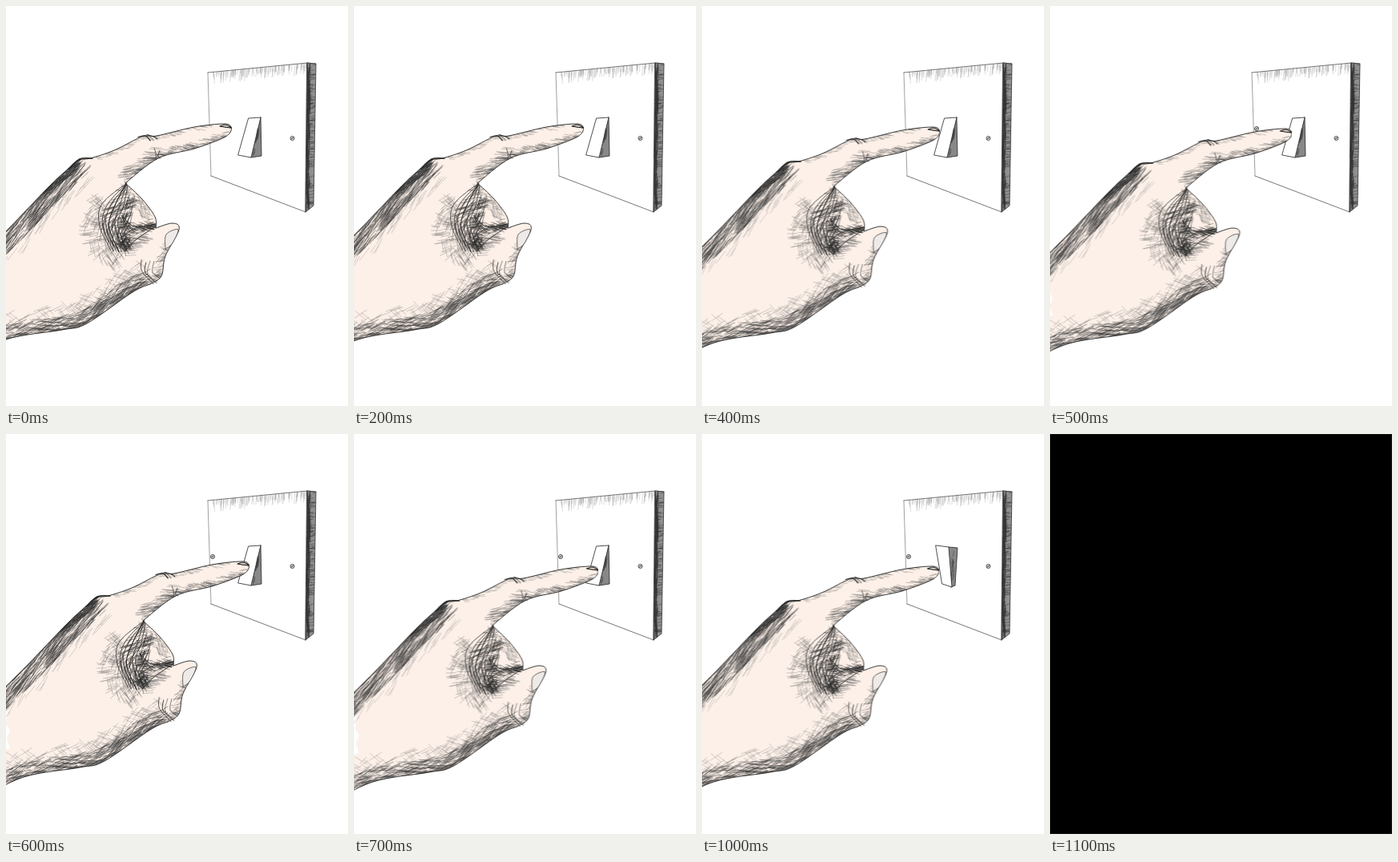
Animation of 427x499 px, one loop 3.1 s. Source, as an HTML page:

```html
<!DOCTYPE html>
<html lang="en">
<head>
<meta charset="utf-8">
<title>Light switch</title>
<style>
html, body { margin: 0; width: 100%; height: 100%; overflow: hidden; background: #fff; }
svg { display: block; width: 100%; height: 100%; }
path { fill: none; stroke: #222; stroke-width: .8; stroke-linecap: round; stroke-linejoin: round; }
#hand, #lift, #up, #down, #screw, #dark { animation: 3100ms step-end infinite; }
#hand { animation-name: reach; }
#lift { animation-name: press; }
#up { animation-name: leave; }
#down { animation-name: flip; }
#screw { animation-name: reveal; }
#dark { animation-name: blackout; }
/* one step every 100 ms */
@keyframes reach {
  0% { transform: translateX(0); }
  3.225% { transform: translateX(0); animation-timing-function: steps(4); }
  16.129% { transform: translateX(20.5px); animation-timing-function: steps(2); }
  22.58% { transform: translateX(23.5px); }
  25.806% { transform: translateX(23.5px); animation-timing-function: steps(2); }
  32.258%, 100% { transform: translateX(14.5px); }
}
@keyframes press {
  0% { transform: translateY(0); }
  6.451% { transform: translateY(0); animation-timing-function: steps(3); }
  16.129% { transform: translateY(6px); animation-timing-function: steps(2); }
  22.58% { transform: translateY(18px); }
  25.806% { transform: translateY(21px); animation-timing-function: steps(2); }
  32.258%, 100% { transform: translateY(18px); }
}
@keyframes leave { 0% { opacity: 1; } 25.806%, 100% { opacity: 0; } }
@keyframes flip { 0% { opacity: 0; } 25.806%, 100% { opacity: 1; } }
@keyframes reveal { 0% { opacity: 0; } 16.129%, 100% { opacity: 1; } }
@keyframes blackout { 0% { opacity: 0; } 35.483%, 100% { opacity: 1; } }
</style>
</head>
<body>
<svg viewBox="0 0 427 499" preserveAspectRatio="none">
  <defs>
    <clipPath id="handClip"><path id="clipShape"/></clipPath>
    <clipPath id="frontClip"><path d="M252 83L376 71 374 256 256 212Z"/></clipPath>
    <clipPath id="sideClip"><path d="M376 71L387 72 384 249 374 257Z"/></clipPath>
    <g id="bolt">
      <circle r="2.6" fill="#ccc" stroke="#555" stroke-width=".9"/>
      <path d="M-1.3 1L1.3-1"/>
    </g>
  </defs>
  <g id="front" clip-path="url(#frontClip)"></g>
  <path d="M252 83L256 212" style="stroke:#888"/>
  <path d="M252 83L376 71 387 72M256 212L374 257" style="stroke:#555"/>
  <path d="M376 71L387 72 384 249 374 257Z" style="fill:#909090;stroke:#333"/>
  <g id="side" clip-path="url(#sideClip)"></g>
  <use href="#bolt" x="357.5" y="165"/>
  <use href="#bolt" id="screw" x="258" y="153"/>
  <g id="up">
    <path d="M318 139L319 187 306 189Z" style="fill:#888"/>
    <path d="M303 140L318 139 306 189 290 186Z" style="fill:#fff"/>
  </g>
  <g id="down">
    <path d="M308 141L319 142 316 189 311 191Z" style="fill:#888"/>
    <path d="M292 139L308 141 312 191 300 187Z" style="fill:#fff"/>
  </g>
  <g id="hand"><g id="lift">
    <path id="skin" style="fill:#fcf0e8;stroke:none"/>
    <path d="M-40 328L-20 330 -22 350 -17 358 -21 368 -17 380 -40 388Z" style="fill:#fff;stroke:none"/>
    <g id="shade" clip-path="url(#handClip)"></g>
    <g id="lines"></g>
  </g></g>
  <g id="dark">
    <rect width="427" height="499"/>
    <rect x=".5" y=".5" width="426" height="498" fill="none" stroke="#171717"/>
  </g>
</svg>
<script>
const $ = id => document.getElementById(id);
let seed = 20;
const random = () => {
  seed = (seed * 1664525 + 1013904223) >>> 0;
  return seed / 4294967296;
};
const points = text => text.split(' ').map(p => p.split(',').map(Number));

// Catmull-Rom spline
function curve(p) {
  const at = i => p[Math.max(0, Math.min(p.length - 1, i))];
  return 'M' + p[0] + p.slice(1).map((end, i) => {
    const c1 = p[i].map((v, k) => v + (end[k] - at(i - 1)[k]) / 6);
    const c2 = end.map((v, k) => v - (at(i + 2)[k] - p[i][k]) / 6);
    return `C${c1} ${c2} ${end}`;
  }).join('');
}

function draw(parent, d, width = .8, color = '#222', fill = 'none') {
  const path = document.createElementNS('http://www.w3.org/2000/svg', 'path');
  path.setAttribute('d', d);
  path.style.cssText = `stroke-width:${width};stroke:${color};fill:${fill}`;
  $(parent).append(path);
}

// Seeded pen strokes to the right of a curve, slanted against its direction
function hatch(parent, d, count, depth, length,
    { from = 0, to = 1, slants = [8], bias = 1, width = .45, color = '#333' } = {}) {
  const guide = document.createElementNS('http://www.w3.org/2000/svg', 'path');
  guide.setAttribute('d', d);
  const total = guide.getTotalLength();
  let strokes = '';
  for (let i = 0; i < count; i++) {
    const s = total * (from + (to - from) * random()) * .99;
    const a = guide.getPointAtLength(s), b = guide.getPointAtLength(s + 1);
    const along = Math.atan2(b.y - a.y, b.x - a.x), off = depth * random() ** bias;
    const turn = along + (slants[i % slants.length] + random() * 14 - 7) * Math.PI / 180;
    const reach = length * (.5 + random() * .6) / 2;
    const x = a.x - Math.sin(along) * off, y = a.y + Math.cos(along) * off;
    const dx = Math.cos(turn) * reach, dy = Math.sin(turn) * reach;
    strokes += `M${x - dx} ${y - dy}L${x + dx} ${y + dy}`;
  }
  draw(parent, strokes, width, color);
}

// A fan of creases blending from one curve into another
function creases(first, last, count, width) {
  const a = points(first), b = points(last);
  for (let i = 0; i < count; i++) {
    const mix = i / (count - 1);
    const p = a.map((q, j) => q.map((v, k) => v + (b[j][k] - v) * mix + (random() - .5) * 3));
    draw('lines', curve(p), width * (.7 + random() * .6));
  }
}

const contour = Object.fromEntries(Object.entries({
  wrist: '-60,340 0,281 58,221 92,191',
  index: '92,191 105,190 135,180 172,162 188,162 235,151 272,147 281,151 279,159 268,166 235,178 190,190 149,221',
  fold: '149,221 170,241 186,263 187,277',
  thumb: '187,277 208,271 216,279 199,312 194,337 180,347',
  heel: '180,347 158,357 101,396 70,404 0,416 -60,446',
  palm: '148,308 126,292 122,262 150,222',
  hollow: '150,306 138,286 146,262 151,230',
  wedge: '187,275 163,291 148,306',
  knuckle: '146,263 160,275 187,272'
}).map(([name, text]) => [name, curve(points(text))]));

const { wrist, index, fold, thumb, heel, palm, hollow, wedge, knuckle } = contour;
const outline = [wrist, index, fold, thumb, heel].join('').replace(/(?!^)M/g, 'L') + 'Z';
$('skin').setAttribute('d', outline);
$('clipShape').setAttribute('d', outline);

// Switch plate
hatch('front', 'M252 83L376 71', 130, 9, 13, { slants: [96], bias: 1.5, width: .35, color: '#999' });
hatch('side', 'M380 72L378 256', 130, 5, 28, { slants: [0], width: .6 });
hatch('side', 'M387 72L384 249', 130, 11, 9, { slants: [80], width: .45 });
hatch('up', 'M317 152L311 186', 16, 3, 8, { slants: [0] });
hatch('down', 'M315 145L314 184', 16, 3, 8, { slants: [0] });

// Back of the hand
hatch('shade', wrist, 520, 21, 20, { slants: [-9, -4], bias: 1.25 });
hatch('shade', wrist, 130, 32, 19, { slants: [-12], width: .3, color: '#777' });
hatch('shade', wrist, 90, 8, 14, { from: .72, to: .98, width: .65 });

// Pointing finger
hatch('shade', index, 100, 5, 7, { from: .06, to: .5, slants: [20], bias: 1.6, width: .3, color: '#666' });
hatch('shade', index, 170, 8, 9, { from: .58, slants: [28], bias: 1.8, width: .35, color: '#555' });
hatch('shade', index, 70, 13, 13, { from: .83, slants: [30], bias: 1.3, width: .35, color: '#555' });

// Hollow of the palm, thumb and folded fingers
hatch('shade', palm, 170, -24, 15, { to: .7, slants: [25, 100], width: .3, color: '#555' });
hatch('shade', palm, 130, 17, 15, { slants: [5, 45], width: .45 });
hatch('shade', hollow, 110, 11, 13, { to: .9, slants: [8, 65], width: .55 });
hatch('shade', wedge, 90, 14, 12, { slants: [15, 55], width: .45 });
hatch('shade', knuckle, 55, 5, 9, { slants: [25], width: .5 });
hatch('shade', fold, 60, 13, 11, { to: .75, slants: [25, -30], width: .3, color: '#555' });
hatch('shade', wedge, 45, -10, 12, { from: .3, slants: [40], width: .3, color: '#555' });
hatch('shade', thumb, 80, 8, 10, { from: .45, slants: [30, 75], bias: 1.5, width: .35, color: '#555' });

// Heel of the hand
hatch('shade', heel, 420, 17, 20, { slants: [8, -14], bias: 1.4 });
hatch('shade', heel, 280, 30, 18, { slants: [55, -18], width: .3, color: '#666' });

// Contours and creases
for (const part of [wrist, index, fold, thumb, heel, wedge, knuckle]) draw('lines', part, .9);
draw('lines', curve(points('78,203 92,191 108,190')), 1.5);
draw('lines', curve(points('199,303 200,285 215,279 207,297 199,303')), .7, '#333', '#eeeae7');
draw('lines', curve(points('267,150 274,148 281,152 267,150')), 1.1, '#111', '#ddd6d0');
creases('150,221 121,248 116,275 130,304', '151,223 147,248 139,273 150,306', 6, .9);
creases('166,165 175,163 181,167', '175,161 185,162 190,166', 3, .9);
creases('186,179 188,185 187,191', '191,181 191,186 193,190', 2, .7);
creases('169,318 170,332 184,346', '186,320 182,333 193,341', 4, .7);
</script>
</body>
</html>
```
